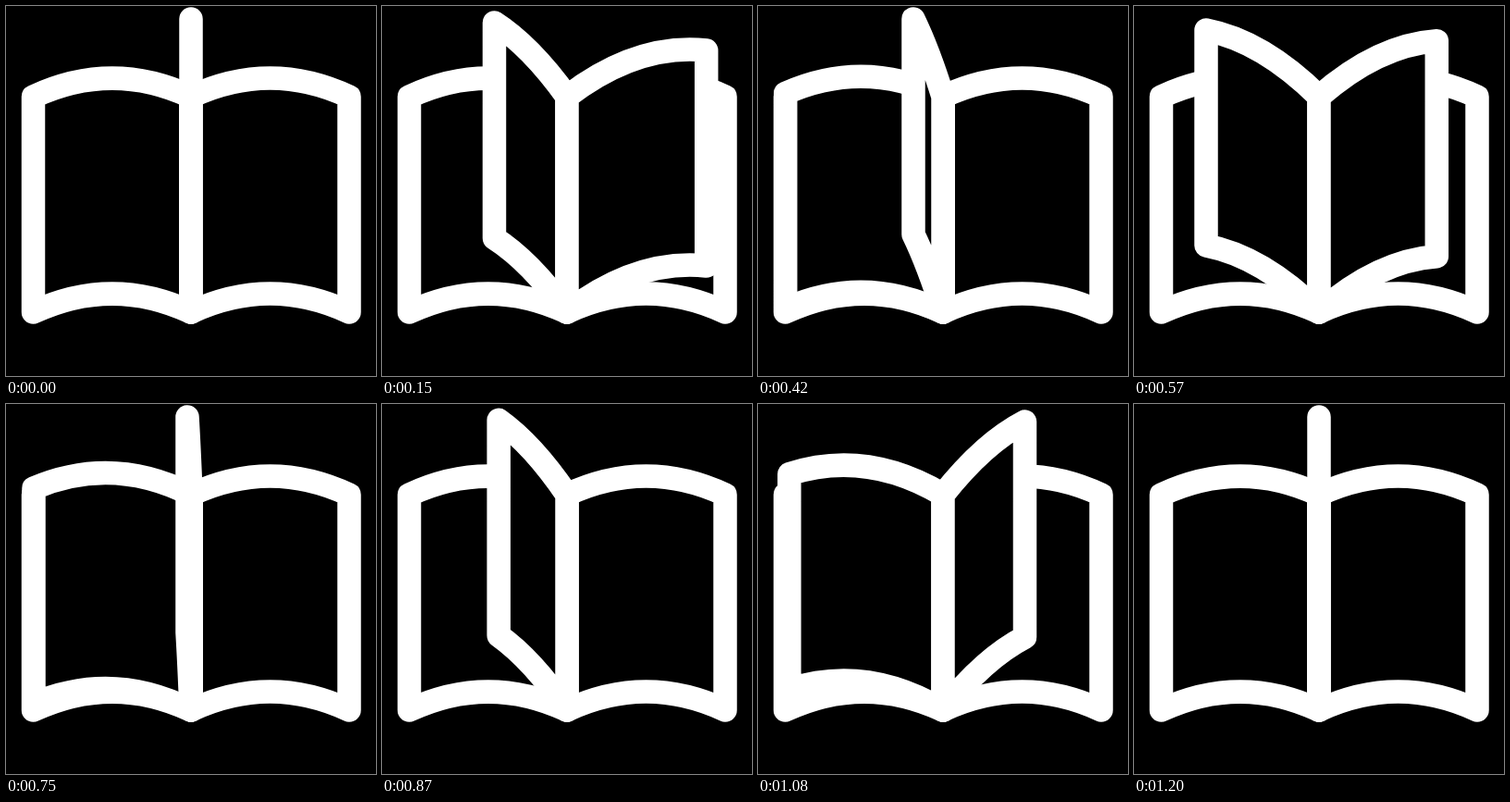
Write an HTML page with a canvas that moves like this. It is 400 px wide and 400 px high and loops after 1.23 s.

```html
<!DOCTYPE html>
<html>
<head>
<meta charset="utf-8">
<style>
  html, body { margin: 0; background: #000; overflow: hidden; }
  canvas { display: block; }
</style>
</head>
<body>
<canvas id="stage" width="400" height="400"></canvas>
<script>
const ctx = document.getElementById('stage').getContext('2d');
const LOOP = 1230, STEP = 30;
const SPINE = 200, TOP = 98, HEIGHT = 233, REACH = 171;

// Moments at which a turning page stands upright
const upright = [0, 350, 728, 1200];

// Outer top corner of a turning page: [ms from upright, x, y]
const turn = [
  [-300, 371, 98], [-210, 354, 51], [-159, 328, 38], [-110, 279, 17],
  [0, 200, 14], [22, 196, 14], [70, 168, 14], [220, 78, 26],
  [240, 63, 33], [262, 52, 38], [400, 30, 91], [460, 29.5, 98]
];

const slope = (i, k) => (turn[i + 1][k] - turn[i][k]) / (turn[i + 1][0] - turn[i][0]);

// Tangent that keeps the interpolation monotone
function tangent(i, k) {
  if (i === 0 || i === turn.length - 1) return 0;
  const a = slope(i - 1, k), b = slope(i, k);
  return a * b > 0 ? 2 * a * b / (a + b) : 0;
}

function corner(time) {
  const i = turn.findIndex((key, n) => n && time <= turn[n][0]) - 1;
  const span = turn[i + 1][0] - turn[i][0];
  const u = (time - turn[i][0]) / span, v = 1 - u;
  return [1, 2].map(k =>
    turn[i][k] * v * v * (1 + 2 * u) + turn[i + 1][k] * u * u * (3 - 2 * u) +
    span * u * v * (v * tangent(i, k) - u * tangent(i + 1, k)));
}

function page(x, y) {
  const open = Math.abs(x - SPINE) / REACH;
  const midX = (x + SPINE) / 2;
  const midY = (y + TOP) / 2 - 2 * (4 + 16 * open * open);
  ctx.beginPath();
  ctx.moveTo(SPINE, TOP);
  ctx.quadraticCurveTo(midX, midY, x, y);
  ctx.lineTo(x, y + HEIGHT);
  ctx.quadraticCurveTo(midX, midY + HEIGHT, SPINE, TOP + HEIGHT);
  ctx.closePath();
  ctx.fill();
  ctx.stroke();
}

function draw(now) {
  const t = Math.floor(now % LOOP / STEP) * STEP;
  ctx.fillStyle = '#000';
  ctx.fillRect(0, 0, 400, 400);
  ctx.strokeStyle = '#fff';
  ctx.lineWidth = 25.5;
  ctx.lineJoin = ctx.lineCap = 'round';
  page(29.5, TOP);
  page(371, TOP);
  for (const moment of upright) {
    const time = t - moment;
    if (time > turn[0][0] && time < turn[turn.length - 1][0]) page(...corner(time));
  }
}

const start = performance.now();
function tick() {
  draw(performance.now() - start);
  requestAnimationFrame(tick);
}
tick();
</script>
</body>
</html>
```
